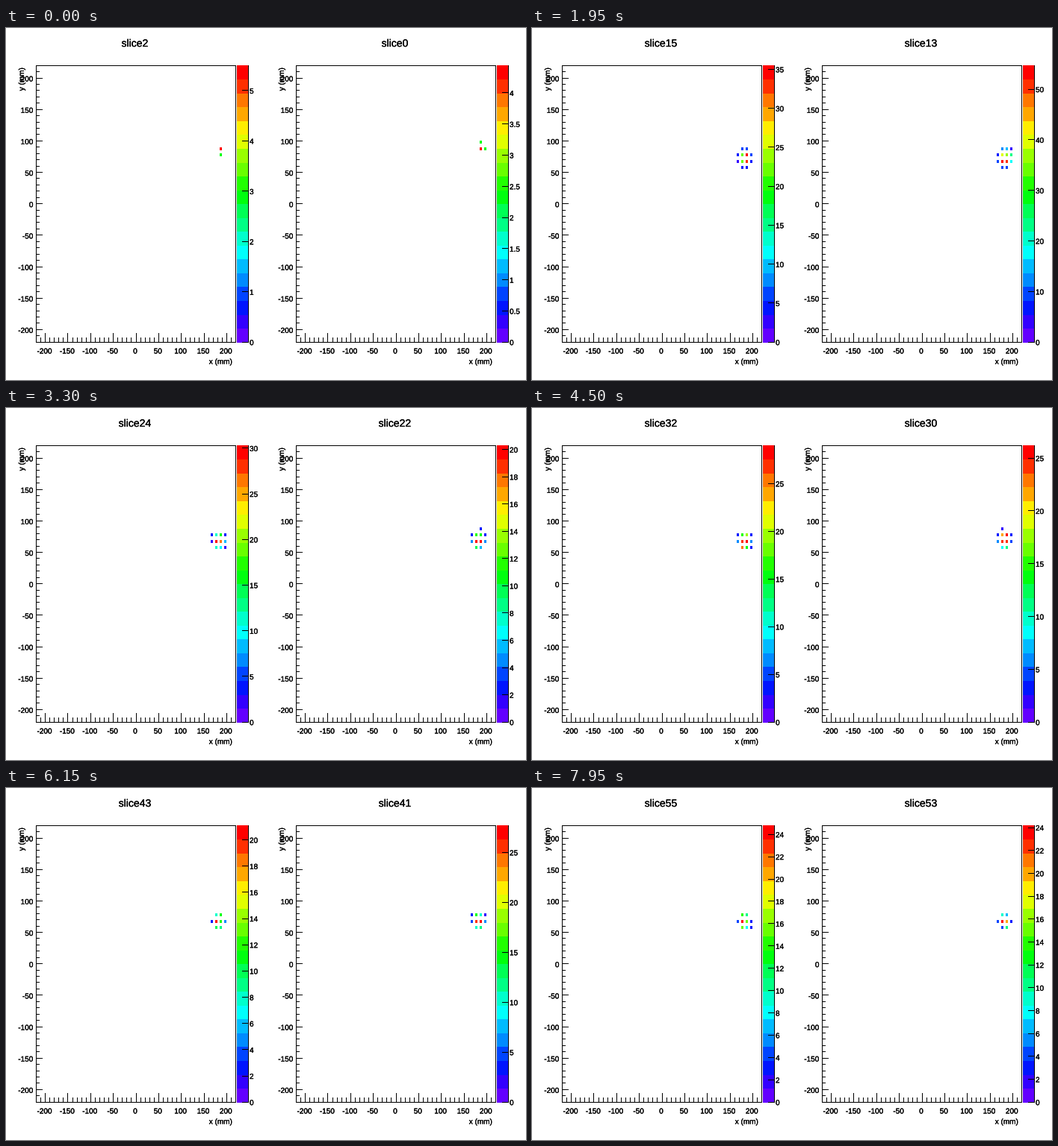
Recreate the animation shown at these times as a matplotlib script. Size 696 by 472 pixels, loop 8000 ms.

```python
import colorsys
import numpy as np
import matplotlib.pyplot as plt
from matplotlib.animation import FuncAnimation
from matplotlib.collections import LineCollection, PolyCollection
from matplotlib.patheffects import withStroke

WIDTH, HEIGHT, DPI = 696, 472, 100
STEP_MS, TICK_MS, LOOP_MS = 150, 50, 8000
PX = 72 / DPI
LEFT, RIGHT, TOP, BOTTOM = 40, 307, 50.2, 421.2
BAR_LEFT, BAR_RIGHT = 309, 324
PAD = 348
LEVELS = 20
ROWS, COLS = 6, 7
FIRST_X, FIRST_Y, PITCH = 155, 100, 10   # mm, corner of the first cell
THRESHOLD = 2.4                          # weakest visible signal

# Brightest signal at a few slices along the shower.
PEAK_AT = [0, 2, 8, 10, 13, 15, 22, 24, 30, 32, 41, 43, 55]
PEAKS = [4.44, 5.5, 58.5, 70, 54.7, 35.5, 20.3, 30.3, 26.2, 29, 27.7, 21.1, 24.8]

plt.rcParams["font.family"] = "Liberation Sans"


def rainbow(level):
    index = int((level + 0.99) * 50 / LEVELS)
    return colorsys.hsv_to_rgb((280 - 5.6 * (index + 1)) / 360, 1, 1)


PALETTE = [rainbow(i) for i in range(LEVELS)]


def shower(number):
    """Peak and normalised cell signals: a noisy spot that drifts and settles."""
    rng = np.random.default_rng(number)
    peak = np.interp(number, PEAK_AT, PEAKS)
    settle = np.exp(-number / 11)
    row, col = 3 - 2 * settle, 2.5 + 0.5 * settle
    r, c = np.mgrid[:ROWS, :COLS]
    distance2 = (r - row) ** 2 + (c - col) ** 2
    grid = np.exp(-distance2 / (2 * 0.8 ** 2)) * rng.lognormal(0, 0.25, r.shape)
    grid /= grid.max()
    return peak, np.where(grid * peak > THRESHOLD, grid, 0)


def map_x(mm):
    return LEFT + 0.5 + (mm + 220) / 440 * (RIGHT - LEFT)


def map_y(mm):
    return BOTTOM - (mm + 220) / 440 * (BOTTOM - TOP)


def box(x, y, w, h):
    return [(x, y), (x + w, y), (x + w, y + h), (x, y + h)]


def snap(value):
    return np.floor(value) + 0.5


def tick_step(peak):
    rough = peak / 10
    power = 10 ** np.floor(np.log10(rough))
    for limit, size in ((1.5, 1), (2.5, 2), (5, 5)):
        if rough / power <= limit:
            return size * power
    return 10 * power


fig = plt.figure(figsize=(WIDTH / DPI, HEIGHT / DPI), dpi=DPI, facecolor="white")
ax = fig.add_axes([0, 0, 1, 1])
ax.set(xlim=(0, WIDTH), ylim=(HEIGHT, 0))
ax.axis("off")


def write(x, y, text, size=10, ha="center", **style):
    return ax.text(x, y, text, fontsize=size * PX, ha=ha, va="baseline",
                   path_effects=[withStroke(linewidth=0.2, foreground="black")],
                   **style)


def add_lines(segments):
    lines = LineCollection(segments, colors="black", linewidths=PX, snap=False,
                           capstyle="projecting", antialiaseds=False, zorder=3)
    return ax.add_collection(lines, autolim=False)


def add_boxes(boxes, colors):
    cells = PolyCollection(boxes, facecolors=colors, edgecolors="none",
                           snap=False, antialiaseds=False, zorder=2)
    return ax.add_collection(cells, autolim=False)


class Panel:
    def __init__(self, dx):
        self.dx = dx
        self.draw_axes()
        band = (BOTTOM - TOP) / LEVELS
        add_boxes([box(dx + BAR_LEFT, BOTTOM - (i + 1) * band,
                       BAR_RIGHT - BAR_LEFT, band) for i in range(LEVELS)], PALETTE)
        self.title = write(dx + 172.5, 25, "", 14)
        self.cells = add_boxes([], [])
        self.ticks = add_lines([])
        self.labels = [write(dx + 326, 0, "", ha="left") for _ in range(16)]

    def draw_axes(self):
        dx = self.dx
        left, right, top, bottom = (snap(v) for v in (LEFT, RIGHT, TOP, BOTTOM))
        corners = box(dx + left, top, right - left, bottom - top)
        lines = [corners + corners[:1]]
        for mm in range(-220, 221, 10):
            major = mm % 50 == 0
            x, y = snap(dx + map_x(mm)), snap(map_y(mm))
            lines.append([(x, bottom), (x, bottom - (12 if major else 6))])
            lines.append([(dx + left, y), (dx + left + (8 if major else 4), y)])
            if major:
                write(dx + map_x(mm) - 1, 436.5, str(mm))
                write(dx + 36.5, map_y(mm) + 4.5, str(mm), ha="right")
        add_lines(lines)
        write(dx + 303, 450.5, "x (mm)", ha="right")
        write(dx + 24, 53, "y (mm)", ha="right", rotation=90, rotation_mode="anchor")

    def show(self, number):
        peak, grid = shower(number)
        self.title.set_text(f"slice{number}")
        boxes, colors = [], []
        for r, c in np.argwhere(grid > 0):
            x = round(map_x(FIRST_X + c * PITCH))
            y = round(map_y(FIRST_Y - r * PITCH))
            boxes.append(box(self.dx + x, y, 3, 4))
            colors.append(PALETTE[min(int(grid[r, c] * LEVELS), LEVELS - 1)])
        self.cells.set_verts(boxes)
        self.cells.set_facecolor(colors)

        right = self.dx + snap(BAR_RIGHT)
        lines = [[(right, snap(TOP)), (right, snap(BOTTOM))]]
        for label in self.labels:
            label.set_text("")
        for label, value in zip(self.labels, np.arange(0, peak, tick_step(peak))):
            y = BOTTOM - value / peak * (BOTTOM - TOP)
            lines.append([(right - 8, snap(y)), (right, snap(y))])
            label.set_text(f"{value:g}")
            label.set_y(y + 4)
        self.ticks.set_segments(lines)


panels = [Panel(0), Panel(PAD)]


def update(frame):
    step = frame * TICK_MS // STEP_MS
    panels[0].show(step + 2)
    panels[1].show(step)
    return []


anim = FuncAnimation(fig, update, frames=LOOP_MS // TICK_MS, interval=TICK_MS,
                     repeat=True, repeat_delay=0, blit=False)
plt.show()
```
